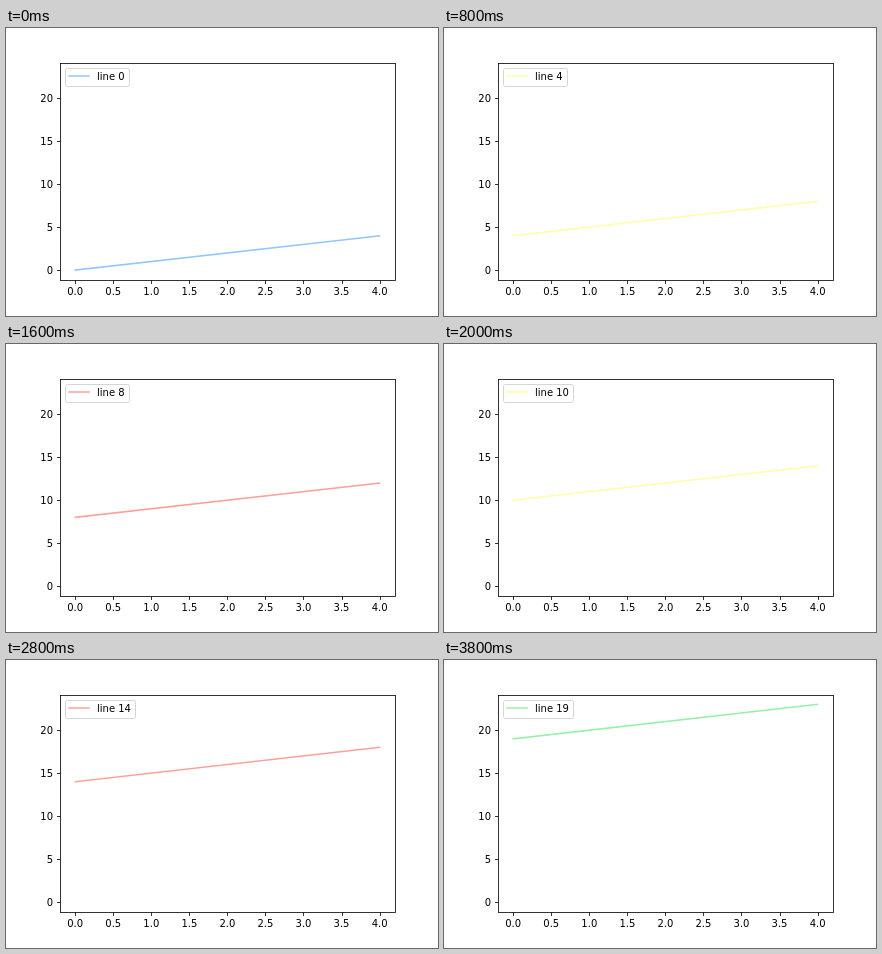
Animation, 432 px wide and 288 px high, one loop 4000 ms. Source, as an HTML page:

```html
<!DOCTYPE html>
<html lang="en">
<head>
<meta charset="utf-8">
<title>Line plot</title>
<style>
  html, body { margin: 0; width: 432px; height: 288px; overflow: hidden; background: #fff; }
  svg { display: block; }
  text { font: 10px "DejaVu Sans", sans-serif; }
  .axis { fill: none; stroke: #000; stroke-width: .8; }
  .line { fill: none; stroke-width: 1.5; stroke-linecap: square; }
</style>
</head>
<body>
<svg width="432" height="288" viewBox="0 0 432 288">
  <g id="ticks"></g>
  <path id="plot" class="line"/>
  <rect class="axis" x="54.5" y="35.5" width="335" height="217"/>
  <rect id="frame" x="59.5" y="40.5" height="18" rx="2" fill="#fff" fill-opacity=".8" stroke="#ccc" stroke-opacity=".8"/>
  <path id="handle" class="line" d="M63 48H83"/>
  <text id="label" x="91" y="52"></text>
</svg>
<script>
const COLORS = ["#92c6ff", "#97f0aa", "#ff9f9a", "#d0bbff", "#fffea3", "#b0e0e6"];
const STEP = 200, COUNT = 20;
const $ = id => document.getElementById(id);

// Data to pixel coordinates
const px = v => 54 + (v + 0.2) / 4.4 * 334.8;
const py = v => 252 - (v + 1.15) / 25.3 * 217.44;
const snap = v => Math.round(v) + 0.5;

let ticks = "";
for (let v = 0; v <= 4; v += 0.5) {
  ticks += `<path class="axis" d="M${snap(px(v))} 252.5v3.5"/>
    <text x="${px(v)}" y="267" text-anchor="middle">${v.toFixed(1)}</text>`;
}
for (let v = 0; v <= 20; v += 5) {
  const y = snap(py(v));
  ticks += `<path class="axis" d="M54.5 ${y}h-3.5"/>
    <text x="47" y="${y + 3.5}" text-anchor="end">${v}</text>`;
}
$("ticks").innerHTML = ticks;

let shown = -1;
function draw(now) {
  const n = Math.floor(now / STEP) % COUNT;
  if (n !== shown) {
    shown = n;
    const color = COLORS[n % COLORS.length];
    $("plot").setAttribute("d", `M${px(0)} ${py(n)}L${px(4)} ${py(n + 4)}`);
    $("plot").setAttribute("stroke", color);
    $("handle").setAttribute("stroke", color);
    $("label").textContent = "line " + n;
    $("frame").setAttribute("width", n < 10 ? 64 : 70);
  }
  requestAnimationFrame(draw);
}
draw(performance.now());
</script>
</body>
</html>
```
